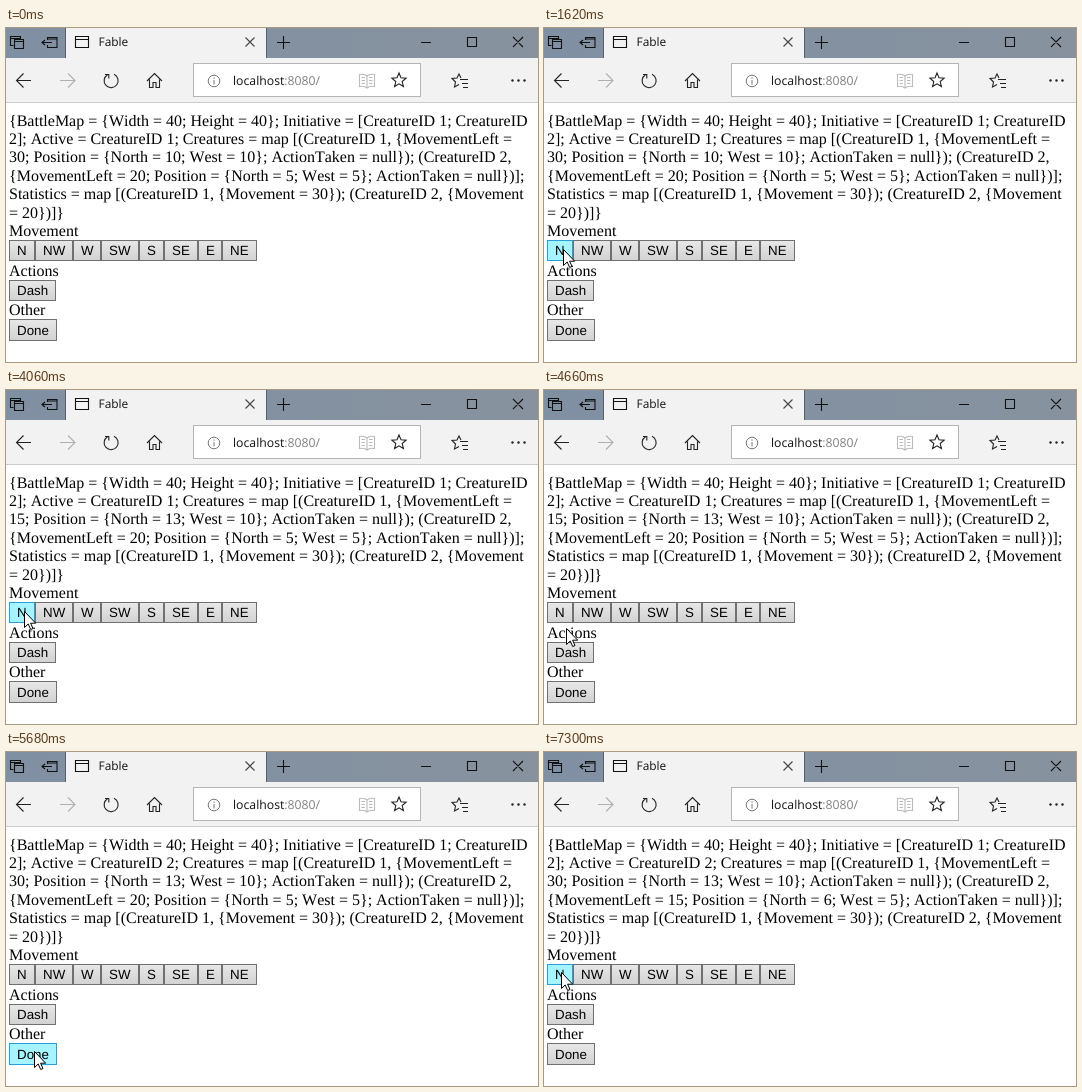
An HTML page that plays this animation: 532 by 334 pixels, repeating every 8 s.

```html
<!DOCTYPE html>
<html lang="en">
<head>
<meta charset="utf-8">
<title>Fable</title>
<style>
  html, body { margin: 0; width: 100%; height: 100%; overflow: hidden; background: #fff; }
  svg { display: block; width: 532px; height: 334px; }
  text { text-rendering: geometricPrecision; font-kerning: none; white-space: pre; }
  .page { font: 16px "Liberation Serif", "Times New Roman", serif; font-kerning: none; }
  .btn text { font: 13.333px "Liberation Sans", Arial, sans-serif; font-kerning: none; }
  .btn rect { fill: url(#face); stroke: #707070; }
  .btn.hover rect { fill: #a6f4ff; stroke: #26a0da; }
  .btn.down rect { fill: #81e0f5; stroke: #1c86ba; }
  .ui { font-family: "Open Sans", "Noto Sans", sans-serif; }
  .icon { fill: none; stroke: #222; stroke-width: 1.1; }
</style>
</head>
<body>
<svg id="stage" viewBox="0 0 532 334" xmlns="http://www.w3.org/2000/svg">
  <defs>
    <linearGradient id="strip">
      <stop offset="0" stop-color="#8090a3"/>
      <stop offset="1" stop-color="#87929e"/>
    </linearGradient>
    <linearGradient id="face" x2="0" y2="1">
      <stop offset="0" stop-color="#e8e8e8"/>
      <stop offset="1" stop-color="#d2d2d2"/>
    </linearGradient>
  </defs>
  <rect width="532" height="334" fill="#fff"/>

  <!-- Tab strip -->
  <rect width="532" height="30" fill="url(#strip)"/>
  <rect x="59" width="202" height="30" fill="#56606c"/>
  <rect x="60" width="200" height="30" fill="#f2f2f2"/>
  <g class="icon" style="stroke:#111">
    <path d="M7.500 17.500H4.500V8.500H14.500V11M4.500 10.500H14.500M8.500 11.500H17.500V20.500H8.500ZM8.500 13.500H17.500"/>
    <path d="M41.500 12V9.500H51V19.500H41.500V17M41.500 11H51M46 14.500H36M39 12L36 14.500L39 17"/>
    <path d="M69.500 8.500H82.500V19.500H69.500ZM69.500 11.500H82.500"/>
    <path d="M239.500 9.500L248.500 18.500M248.500 9.500L239.500 18.500" stroke="#444"/>
    <path d="M271 14.500H284M277.500 8V21"/>
    <path d="M415 14.500H425M461.500 9.500H470.500V18.500H461.500ZM507 9L517 19M517 9L507 19"/>
  </g>
  <text class="ui" x="92.500" y="18" font-size="11.900" fill="#111">Fable</text>

  <!-- Toolbar -->
  <rect y="30" width="532" height="44" fill="#f2f2f2"/>
  <rect y="74" width="532" height="1" fill="#ccc"/>
  <rect x="187.500" y="35.500" width="227" height="33" fill="#fff" stroke="#b5b5b5"/>
  <g class="icon" stroke-width="1.200">
    <path d="M10.500 52.500H25M17.500 45.500L10.500 52.500L17.500 59.500"/>
    <path d="M54 52.500H69M62 45.500L69 52.500L62 59.500" style="stroke:#b0b0b0"/>
    <path d="M108 46.300A7 7 0 1 1 101.500 46.700M99 46.500H102.800V50.500"/>
    <path d="M141 53L148.500 45.500L156 53M143.500 51.500V59.500H147V54.500H150V59.500H153.500V51.500"/>
    <g stroke="#777" stroke-width="1">
      <circle cx="208" cy="53" r="5.800"/>
      <path d="M208 52V56.500M208 49.500V50.800"/>
    </g>
    <path d="M361 48C359 46 356 46 353.500 46.500V58.500C356 58 359 58 361 60C363 58 366 58 368.500 58.500V46.500C366 46 363 46 361 48V60M355.500 49.500H359M355.500 52.500H359M355.500 55.500H359M363 49.500H366.500M363 52.500H366.500M363 55.500H366.500" style="stroke:#bbb"/>
    <path id="star"/>
    <path id="hub"/>
    <path d="M454 51.500H462M456 55.500H462M457 59.500H462"/>
  </g>
  <g fill="#222">
    <circle cx="506.500" cy="52.500" r="1.200"/>
    <circle cx="512.500" cy="52.500" r="1.200"/>
    <circle cx="518.500" cy="52.500" r="1.200"/>
  </g>
  <text class="ui" x="227" y="57" font-size="12.250" fill="#111">localhost<tspan fill="#808080">:8080/</tspan></text>

  <g id="page" class="page"></g>
  <path id="cursor" d="M.5 .5V16.500L4.200 13L6.700 18.500L9 17.500L6.600 12.200H11.700Z" fill="#fff" stroke="#000" stroke-linejoin="round"/>
</svg>
<script>
const LOOP = 8000;
const page = document.getElementById('page');
const cursor = document.getElementById('cursor');

// time, x, y of the pointer
const pointer = [
  [200, 95, 278], [400, 42, 247], [600, 0, 216],
  [1000, 9, 219], [1200, 14, 223], [1400, 18, 222], [1620, 19, 221],
  [4060, 18, 221], [4660, 22, 238], [4860, 27, 251], [5080, 32, 266],
  [5280, 30, 283], [5480, 28, 297], [5680, 28, 299],
  [5880, 29, 280], [6100, 30, 246], [6300, 30, 221],
  [6500, 25, 221], [6700, 20, 220], [6900, 17, 220]
];

// time and the values that change then
const model = [
  [0, { active: 1, left1: 30, north1: 10, left2: 20, north2: 5 }],
  [2440, { left1: 25, north1: 11 }],
  [3240, { left1: 20, north1: 12 }],
  [4060, { left1: 15, north1: 13 }],
  [5680, { active: 2, left1: 30 }],
  [7300, { left2: 15, north2: 6 }]
];

const presses = [[2020, 2440]];

function add(tag, parent, attrs, label = '') {
  const el = document.createElementNS('http://www.w3.org/2000/svg', tag);
  for (const key in attrs) el.setAttribute(key, attrs[key]);
  el.textContent = label;
  parent.appendChild(el);
  return el;
}

function starPath(cx, cy, r) {
  return 'M' + Array.from({ length: 10 }, (_, i) => {
    const a = i * Math.PI / 5 - Math.PI / 2, d = i % 2 ? r * 0.45 : r;
    return (cx + d * Math.cos(a)).toFixed(2) + ' ' + (cy + d * Math.sin(a)).toFixed(2);
  }).join('L') + 'Z';
}
document.getElementById('star').setAttribute('d', starPath(393, 52.5, 7.5));
// The hub star is open on its lower right, where the list lines sit.
document.getElementById('hub').setAttribute('d',
  'M455 50L453 46L451 50L446 50.500L449.500 54L448.500 59L453 56.500');

const lines = Array.from({ length: 6 }, (_, i) =>
  add('text', page, { x: 3, y: Math.round(97.6 + i * 18.4) }));
[['Movement', 208], ['Actions', 248], ['Other', 287]].forEach(([label, y]) =>
  add('text', page, { x: 3, y }, label));

const buttons = [];
function addButton(label, x, y, right, bottom) {
  const el = add('g', page, { class: 'btn' });
  add('rect', el, { x: x + 0.5, y: y + 0.5, width: right - x - 1, height: bottom - y - 1 });
  add('text', el, { x: x + 8, y: bottom - 6 }, label);
  buttons.push({ el, x, y, right, bottom });
}
const edges = [3, 29, 67, 95, 133, 158, 192, 216, 251];
['N', 'NW', 'W', 'SW', 'S', 'SE', 'E', 'NE'].forEach((label, i) =>
  addButton(label, edges[i], 212, edges[i + 1], 233));
addButton('Dash', 3, 252, 50, 273);
addButton('Done', 3, 291, 51, 313);

function describe(s) {
  return [
    '{BattleMap = {Width = 40; Height = 40}; Initiative = [CreatureID 1; CreatureID',
    `2]; Active = CreatureID ${s.active}; Creatures = map [(CreatureID 1, {MovementLeft =`,
    `${s.left1}; Position = {North = ${s.north1}; West = 10}; ActionTaken = null}); (CreatureID 2,`,
    `{MovementLeft = ${s.left2}; Position = {North = ${s.north2}; West = 5}; ActionTaken = null})];`,
    'Statistics = map [(CreatureID 1, {Movement = 30}); (CreatureID 2, {Movement',
    '= 20})]}'
  ];
}

function draw(t) {
  const state = Object.assign({}, ...model.filter(m => m[0] <= t).map(m => m[1]));
  describe(state).forEach((text, i) => {
    if (lines[i].textContent !== text) lines[i].textContent = text;
  });

  const [, px, py] = pointer.filter(p => p[0] <= t).pop() || [0, -50, -50];
  cursor.setAttribute('transform', `translate(${px} ${py})`);
  const down = presses.some(([from, to]) => t >= from && t < to);
  for (const b of buttons) {
    const over = px >= b.x && px < b.right && py >= b.y && py < b.bottom;
    b.el.setAttribute('class', 'btn' + (over ? down ? ' hover down' : ' hover' : ''));
  }
}

const start = performance.now();
function tick() {
  draw((performance.now() - start) % LOOP);
  requestAnimationFrame(tick);
}
tick();
</script>
</body>
</html>
```
